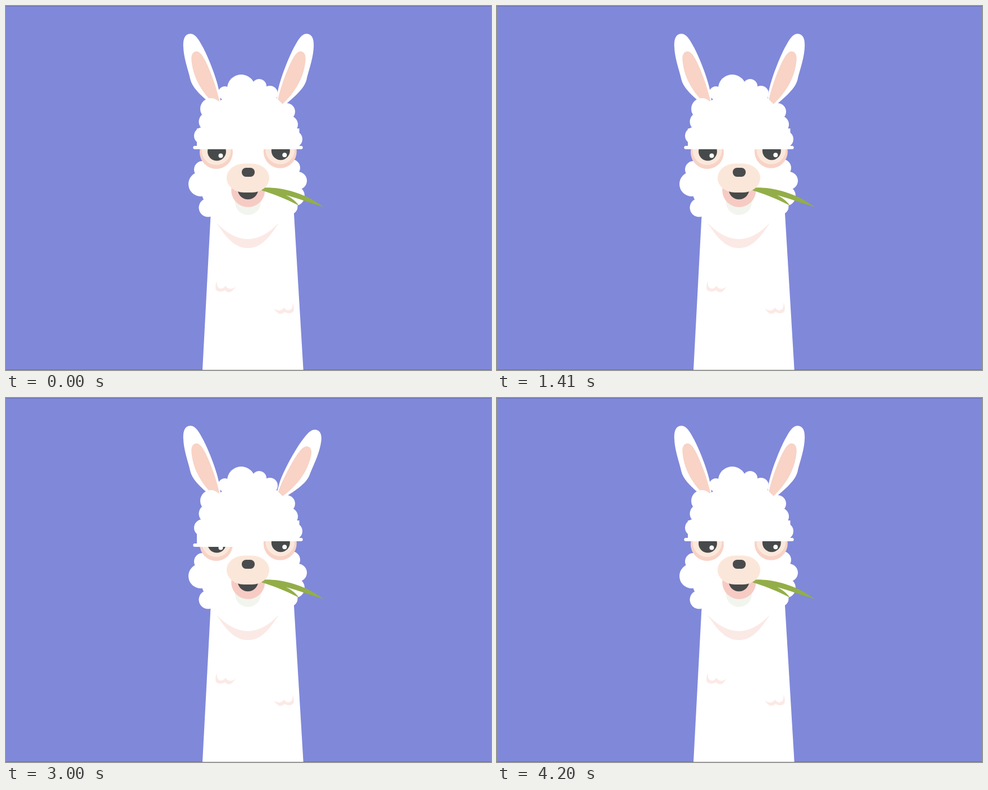
Write an HTML page that moves like this. It is 864 px wide and 648 px high and loops after 4500 ms.

```html
<!DOCTYPE html>
<html lang="en">
<head>
<meta charset="utf-8">
<title>Chewing llama</title>
<style>
  html, body { margin: 0; width: 100%; height: 100%; overflow: hidden; background: #8088da; }
  svg { display: block; width: 100vw; height: 100vh; }
</style>
</head>
<body>
<svg viewBox="0 0 864 648">
  <defs>
    <g id="ear">
      <path fill="#fff" d="M328 49.5C318 50 315 60 316 74C317 95 326 118 328.5 131C333 148 350 161 368 177L382 168L380 153C376 130 360 90 350 72C342 57 336 49 328 49.5Z"/>
      <path fill="#f8d3c6" d="M338 81C331 82 329 90 331 102C334 125 346 152 374 177L380 168C374 140 360 105 352 92C347 84 343 80 338 81Z"/>
    </g>
    <path id="tuft" fill="#fce9e6" d="M376 489C372 498 372 506 377 507.5Q384 510 390 506Q398 513 404 506Q407 503 409 500Q403 504 398 503.5Q393 502 391 498Q387 504 382 503C376 502 375 496 376 489Z"/>
    <g id="eye">
      <circle r="29.5" fill="#f8d3c6"/>
      <circle cy="-3.5" r="26" fill="#fbe8dc"/>
      <circle cx="1" cy="-1.5" r="16.5" fill="#474a4a"/>
      <circle cx="8" cy="6" r="4" fill="#fff"/>
    </g>
  </defs>

  <rect width="864" height="648" fill="#8088da"/>
  <g id="earL"><use href="#ear"/></g>
  <g id="earR"><use href="#ear" transform="matrix(-1 0 0 1 864 0)"/></g>

  <path fill="#fff" d="M365 365H512.7L529.7 648H350Z"/>
  <g id="wool" fill="#fff">
    <path d="M392 152L419 140L470 152L484 166L500 182L506 215L510 240L508 290L516 325L508 358L500 371H364L350 340L350 295L355 275V245L350 230L360 200L368 175L384 167Z"/>
  </g>
  <use href="#tuft"/>
  <use href="#tuft" transform="matrix(-1 0 0 1 886 38.5)"/>

  <use href="#eye" x="374.5" y="260.5"/>
  <use href="#eye" x="488.3" y="259.2"/>
  <g fill="#fff" stroke="#fff" stroke-linecap="round" stroke-width="6">
    <g id="lidL"><path stroke="none" d="M340 218H432V255H340Z"/><path d="M336.3 252H404"/></g>
    <g id="lidR"><path stroke="none" d="M432 218H522.5V255H432Z"/><path d="M461 252H525.7"/></g>
  </g>

  <g id="jaw">
    <path fill="#fbe9e5" d="M375 386Q431 444 486 386C467 416 452 431 431 431S394 416 375 386Z"/>
    <circle cx="431" cy="349" r="23" fill="#f2f5ee"/>
    <circle cx="431.3" cy="328" r="30" fill="#f6cbc4"/>
    <circle cx="431" cy="326" r="18.3" fill="#474a4a"/>
    <path id="grass" fill="#93ae48" d="M443 325C470 320 520 324 566 358C545 352 520 342 499 337C508 341 516 347 522 355.5C500 344 475 333 443 325Z"/>
  </g>
  <rect x="393" y="280.5" width="76" height="51.5" rx="31" ry="25.7" fill="#fbe7da"/>
  <rect x="420" y="288" width="23" height="16" rx="7.5" fill="#4a4b4c"/>
  <path fill="#000" opacity=".18" d="M0 0H864V1H0ZM0 647H864V648H0Z"/>
</svg>
<script>
const LOOP = 4500, STEP = 30;
const el = id => document.getElementById(id);
const place = (id, transform) => el(id).setAttribute('transform', transform);

// x, y, radius of each wool curl
const curls = [
  [419, 147, 25], [451, 143, 13], [390, 155, 12], [470, 156, 14],
  [365, 183, 19], [360, 206, 16.5], [350, 231, 15],
  [500, 188, 15], [504, 211, 16], [513, 237, 15],
  [350, 291, 15], [347, 317, 22], [360, 359, 16.5],
  [509, 288, 15], [520, 311, 16], [514, 338, 18], [505, 357, 14.5]
];
el('wool').innerHTML += curls.map(([x, y, r]) => `<circle cx="${x}" cy="${y}" r="${r}"/>`).join('');

// Progress of t through a span, clamped to 0..1
const span = (t, from, to) => Math.min(1, Math.max(0, (t - from) / (to - from)));
// Smooth rise and fall within a span
const bump = (t, from, to, power = 2) => Math.sin(Math.PI * span(t, from, to)) ** power;

function draw(t) {
  const chew = t % 1800;
  const open = bump(chew, 0, 600);
  const side = Math.sin(2 * Math.PI * span(chew, 0, 600));
  place('jaw', `translate(${4 * side * Math.abs(side)} ${13.5 * open})`);
  place('grass', `rotate(${-16 * open} 440 327)`);

  const blink = t < 2000 ? t - 900 : t - 2610;
  place('lidL', `translate(0 ${30 * bump(blink, 0, 485)})`);
  place('lidR', `translate(0 ${22 * bump(blink, 60, 385, 3)})`);

  const twitch = span(t, 2860, 3270) - span(t, 3270, 3590);
  place('earL', `rotate(${-25 * bump(t, 600, 800)} 374 174)`);
  place('earR', `rotate(${22 * twitch} 490 174)`);
}

function tick() {
  draw(Math.floor(performance.now() % LOOP / STEP) * STEP);
  requestAnimationFrame(tick);
}
tick();
</script>
</body>
</html>
```
